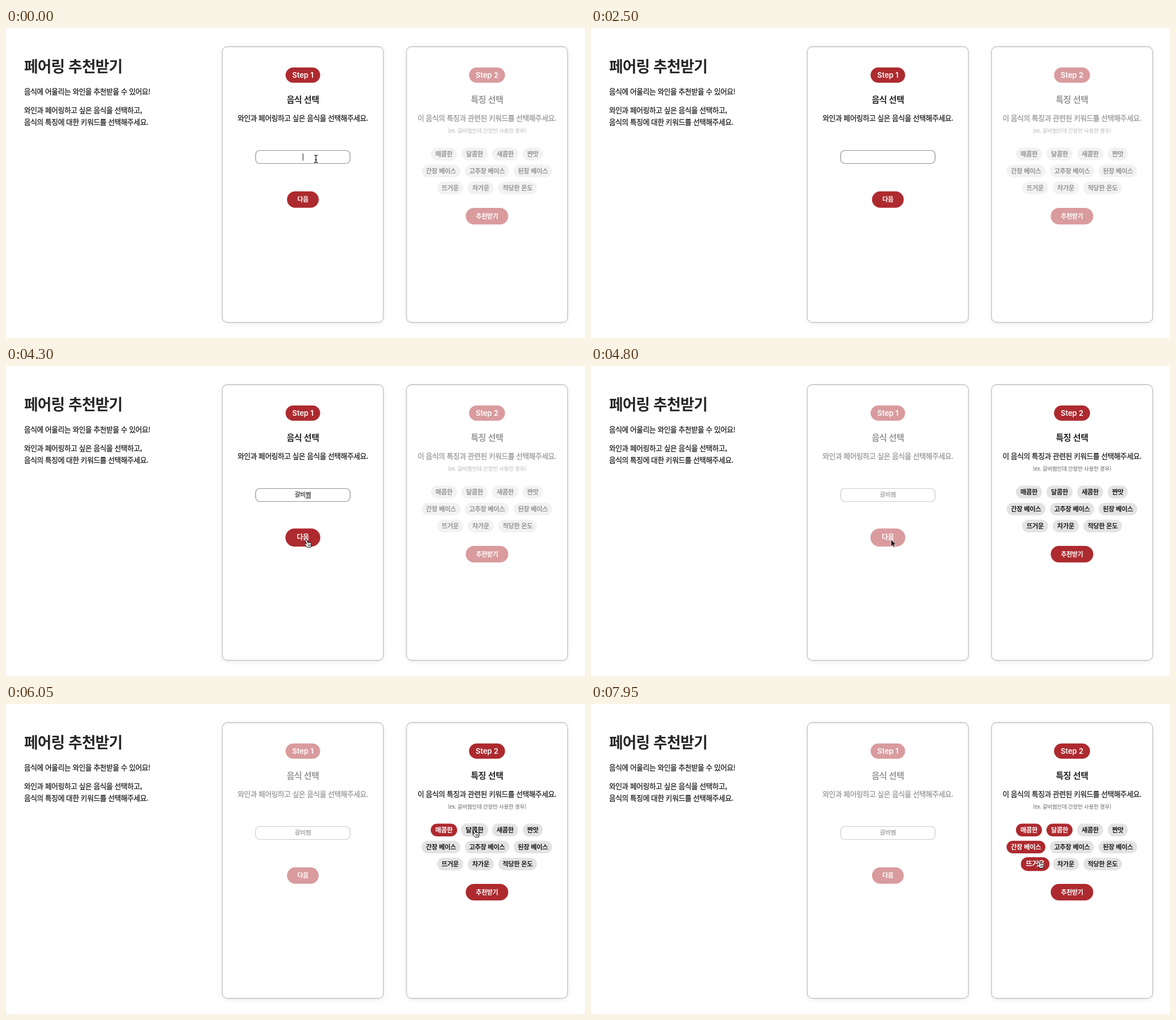
These frames come from a looping animation (1022x548 px, 8 s). An HTML page:

```html
<!DOCTYPE html>
<html lang="ko">
<head>
<meta charset="utf-8">
<style>
  html, body { margin: 0; width: 100%; height: 100%; overflow: hidden; background: #fff; }
  svg { display: block; width: 100vw; height: 100vh; }
  text { font-family: "Noto Sans CJK KR", "Noto Sans CJK", "Noto Sans CJK JP", sans-serif; letter-spacing: -.03em; }
  .latin { font-family: Inter, sans-serif; letter-spacing: 0; }
  .medium { stroke: #1c1c1c; stroke-width: .02em; }
  .card { fill: #fff; stroke: #bfbfbf; stroke-width: 1.3; filter: drop-shadow(0 2px 5px rgba(0, 0, 0, .06)); }
</style>
</head>
<body>
<svg id="stage" viewBox="0 0 1022 548"></svg>
<script>
const LOOP = 8000, STEP = 50, SWITCH = 4800;
const RED = '#ad2a2f', GREY = '#e3e3e3', INK = '#1c1c1c';
const FIELD_X = 523.9, FIELD_SIZE = 10.7, SYLLABLE = FIELD_SIZE * .89;
const BODY = 12.7;

// y is the vertical centre of the line
function label(str, x, y, size, { weight = 400, fill = INK, anchor = 'middle', cls = '' } = {}) {
  return `<text x="${x}" y="${y + size * .35}" font-size="${size}" font-weight="${weight}"
    fill="${fill}" text-anchor="${anchor}" class="${cls}">${str}</text>`;
}

function pill(id, str, x, y, w, h, size, fill, ink, cls) {
  return `<g id="${id}" transform="translate(${x + w / 2} ${y + h / 2})"><g>
    <rect x="${-w / 2}" y="${-h / 2}" width="${w}" height="${h}" rx="${h / 2}" fill="${fill}"/>
    ${label(str, 0, 0, size, { weight: 600, fill: ink, cls })}</g></g>`;
}

const body = (str, x, y, anchor) => label(str, x, y, BODY, { anchor, cls: 'medium' });
const heading = (str, x) => label(str, x, 126.8, 15, { weight: 600, fill: '#262626' });
const card = x => `<rect class="card" x="${x}" y="33" width="284.5" height="487.5" rx="9"/>`;

const tags = [
  ['매콤한', 750, 0, 46], ['달콤한', 804, 0, 46], ['새콤한', 858, 0, 46], ['짠맛', 912, 0, 35.5],
  ['간장 베이스', 733.5, 1, 68.5], ['고추장 베이스', 810, 1, 78], ['된장 베이스', 896, 1, 68],
  ['뜨거운', 761, 2, 46], ['차가운', 815, 2, 46], ['적당한 온도', 869, 2, 68],
];

const stage = document.getElementById('stage');
stage.innerHTML = `
  ${label('페어링 추천받기', 32, 68.3, 26.75, { anchor: 'start', weight: 700, fill: '#262626' })}
  ${body('음식에 어울리는 와인을 추천받을 수 있어요!', 32, 112.7, 'start')}
  ${body('와인과 페어링하고 싶은 음식을 선택하고,', 32, 146, 'start')}
  ${body('음식의 특징에 대한 키워드를 선택해주세요.', 32, 166.7, 'start')}
  ${card(381.7)}${card(706.9)}
  <g id="food">
    ${pill('step1', 'Step 1', 493.5, 69.8, 61, 27, 13, RED, '#fff', 'latin')}
    ${heading('음식 선택', 524)}
    ${body('와인과 페어링하고 싶은 음식을 선택해주세요.', 524, 159.6)}
    <rect x="440.6" y="216.5" width="166.8" height="23" rx="7.5" fill="#fff" stroke="#929292" stroke-width="1.2"/>
    <text id="typed" class="medium" x="${FIELD_X}" y="231.2" font-size="${FIELD_SIZE}" fill="${INK}" text-anchor="middle"></text>
    <path id="underline" stroke="${INK}"/>
    <path id="caret" stroke="#222" stroke-width="1.1"/>
    ${pill('next', '다음', 496, 288.7, 56, 29, 11, RED, '#fff')}
  </g>
  <g id="traits">
    ${pill('step2', 'Step 2', 817.3, 69.8, 63.5, 27, 13, RED, '#fff', 'latin')}
    ${heading('특징 선택', 849)}
    ${body('이 음식의 특징과 관련된 키워드를 선택해주세요.', 849, 159.6)}
    ${label('(ex. 갈비찜인데 간장만 사용한 경우)', 849, 181.8, 9.6, { fill: '#666' })}
    ${tags.map(([str, x, row, w], i) => pill('tag' + i, str, x, 211.6 + 30.1 * row, w, 22.3, 11.3, GREY, INK)).join('')}
    ${pill('submit', '추천받기', 811.5, 318, 75, 29.3, 11, RED, '#fff')}
  </g>
  <g id="cursor">
    <path id="beam" d="M-3.2-6.5q3.2 0 3.2 2V4.5q0 2-3.2 2M3.2-6.5q-3.2 0-3.2 2M0 4.5q0 2 3.2 2M-1.6 1.5H1.6" fill="none" stroke="#111" stroke-width="1.2"/>
    <path id="arrow" d="M0 0V12L2.8 9.4 4.8 13.8 6.7 13 4.8 8.7H8.7Z" fill="#000" stroke="#fff" stroke-width=".8"/>
    <g id="hand" stroke="#111" stroke-linejoin="round" stroke-linecap="round">
      <path d="M-1.4 1Q-.1-.9 1.2.8L2.8 5Q4 3.9 5 5 6.3 4.2 7 5.4 8.6 5 9 6.8 9.6 10 8.2 13.6H2.2Q.8 10.6-2.6 8.5-3.1 6.6-1 6.9L.6 7.7Z" fill="#fff"/>
      <path d="M3.3 8.5l.7 3M5.2 8.3l.5 3M7 8l.3 3M2.8 5l.5 1.5M5 5l.4 1.4" fill="none" stroke-width=".8"/>
    </g>
  </g>`;

const el = id => document.getElementById(id);

const typing = [
  [0, ''], [2600, 'ㄱ'], [2650, '가'], [2850, '갈'], [3000, '갈ㅂ'], [3100, '갈비'],
  [3350, '갈비ㅉ'], [3500, '갈비찌'], [3650, '갈비찜'],
];
const cursorKinds = [
  [0, 'beam'], [1650, ''], [3800, 'beam'], [3900, 'arrow'], [3950, 'hand'], [SWITCH, 'arrow'], [5150, 'hand'],
];
const cursorPath = [
  [0, 547, 231.3], [3800, 547, 231.3], [3900, 541.5, 281], [4100, 531, 318], [4300, 529.7, 307],
  [4800, 529.7, 307], [4900, 545, 304], [5050, 630, 283], [5200, 722, 256], [5350, 770, 229.5],
  [5600, 774, 224], [5850, 774, 224], [6050, 826, 222], [6250, 826, 222], [6450, 794, 270],
  [6600, 786.3, 246.5], [7350, 786.3, 246.5], [7500, 789, 269], [7650, 790, 276.5], [LOOP, 790, 276.5],
];
// Hover spans and the moment of selection
const targets = [
  { id: 'next', hovers: [[3950, 4900]] },
  { id: 'tag0', hovers: [[5350, 5900]], picked: 5800 },
  { id: 'tag1', hovers: [[5950, 6350]], picked: 6200 },
  { id: 'tag4', hovers: [[5150, 5300], [6500, 7400]], picked: 7000 },
  { id: 'tag7', hovers: [[7450, LOOP]], picked: 7950 },
];

const latest = (list, t) => list.filter(([start]) => start <= t).pop()[1];
const ramp = (t, start) => {
  const p = Math.min(1, Math.max(0, (t - start) / 200));
  return p * p * (3 - 2 * p);
};
const show = (id, on) => el(id).setAttribute('visibility', on ? 'visible' : 'hidden');

function cursorAt(t) {
  const i = cursorPath.findIndex(([time]) => time > t);
  const [t0, x0, y0] = cursorPath[i - 1], [t1, x1, y1] = cursorPath[i];
  const p = (t - t0) / (t1 - t0);
  return [x0 + (x1 - x0) * p, y0 + (y1 - y0) * p];
}

function drawField(t) {
  const word = latest(typing, t), end = FIELD_X + word.length * SYLLABLE / 2;
  el('typed').textContent = word;
  el('underline').setAttribute('d', `M${end - SYLLABLE} 233.5H${end}`);
  show('underline', word && t < 4650);
  el('caret').setAttribute('d', `M${end + .3} 222V234.6`);
  show('caret', word ? t < 4200 : (t + 400) % 1000 < 500);
}

function draw(t) {
  const second = t >= SWITCH;
  el('food').setAttribute('opacity', second ? .47 : 1);
  el('traits').setAttribute('opacity', second ? 1 : .47);
  drawField(t);
  for (const { id, hovers, picked } of targets) {
    const grow = Math.max(...hovers.map(([a, b]) => Math.min(ramp(t, a), 1 - ramp(t, b))));
    const shape = el(id).firstElementChild;
    shape.setAttribute('transform', `scale(${1 + .1 * grow})`);
    if (picked) {
      shape.querySelector('rect').setAttribute('fill', t >= picked ? RED : GREY);
      shape.querySelector('text').setAttribute('fill', t >= picked ? '#fff' : INK);
    }
  }
  const kind = latest(cursorKinds, t);
  for (const id of ['beam', 'arrow', 'hand']) show(id, id === kind);
  el('cursor').setAttribute('transform', `translate(${cursorAt(t)})`);
}

function tick() {
  draw(Math.floor(performance.now() % LOOP / STEP) * STEP);
  requestAnimationFrame(tick);
}
tick();
</script>
</body>
</html>
```
